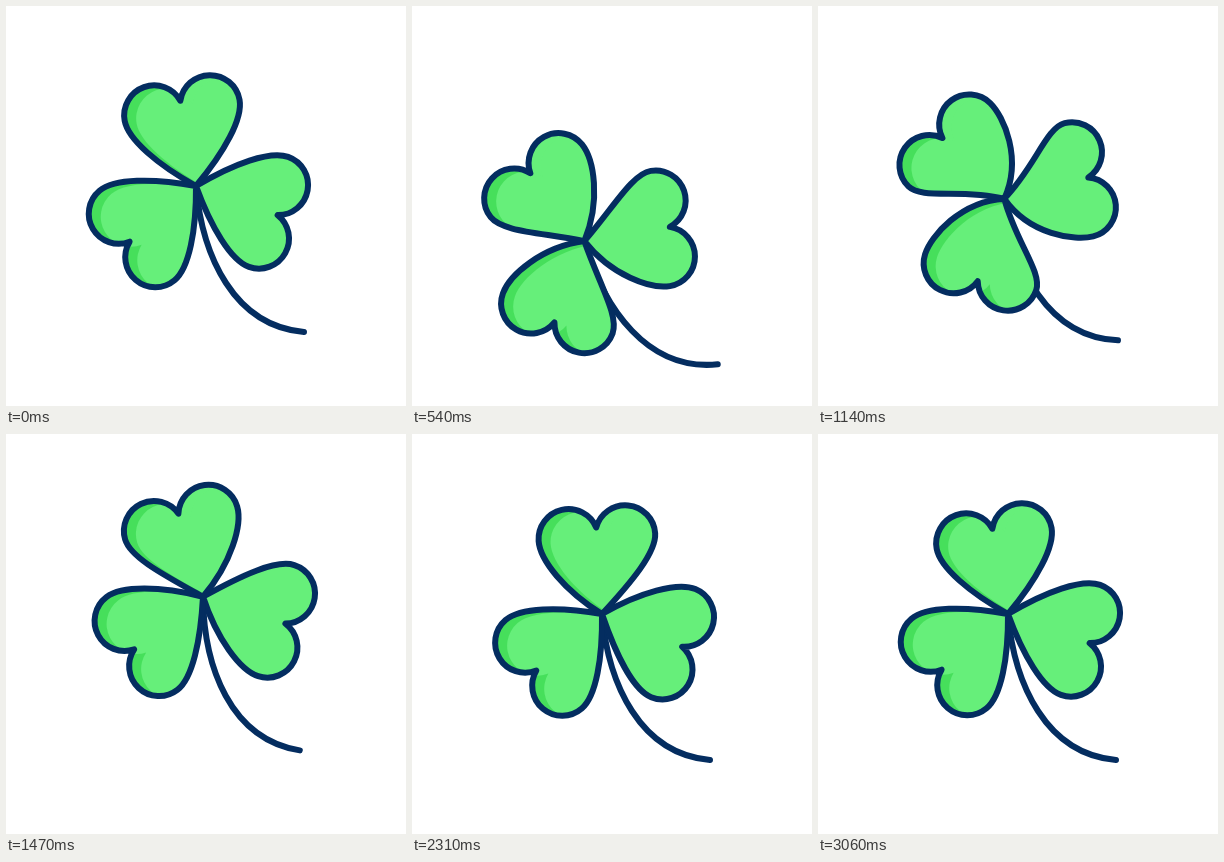
Recreate the animation shown at these times as an HTML page with a canvas. Size 400x400 px, loop 5090 ms.

```html
<!DOCTYPE html>
<html lang="en">
<head>
<meta charset="utf-8">
<title>Swaying clover</title>
<style>
  html, body { margin: 0; height: 100%; overflow: hidden; background: #fff; }
  canvas { display: block; width: 100vw; height: 100vh; }
</style>
</head>
<body>
<canvas id="stage" width="400" height="400"></canvas>
<script>
const LOOP = 5090, STEP = 30, END = 3060;
const NAVY = "#042d60", LIGHT = "#66ef7a", SHADE = "#46df5b";
const LOBE = { x: 28.4, y: -77, r: 30 };
const ctx = document.getElementById("stage").getContext("2d");
const stem = new Path2D("M0 0C6 70 38 140 108 146");
const radians = degrees => degrees * Math.PI / 180;

// Ease between a few turning points [time, value, skew]; a skew below 1 starts faster.
function swing(t, turns) {
  let from = 0, value = 0;
  for (const [to, next, skew = 1] of turns) {
    if (t < to) {
      const u = Math.max(0, (t - from) / (to - from)) ** skew;
      return value + (next - value) * u * u * (3 - 2 * u);
    }
    from = to;
    value = next;
  }
  return value;
}

const sway = t => swing(t, [[620, 1], [1440, -0.38, 1.3], [2300, 0]]);
const bob = t => swing(t, [[600, 56, 0.75], [1420, -18, 1.4], [2250, 0, 0.75]]);
const flap = t => swing(t, [[1000, -34], [1820, 19], [2540, -7], [2870, 0]]);

// Heart with its tip at the origin; bending turns only the part near the tip.
function heart(bend) {
  const c = Math.cos(radians(bend)), s = Math.sin(radians(bend));
  const near = x => [x * c + 28 * s, x * s - 28 * c];
  const { x, y, r } = LOBE, side = x + r;
  const notch = y - Math.sqrt(r * r - x * x);
  return new Path2D(`M0 0C${near(34)} ${side} -58 ${side} ${y}
    A${r} ${r} 0 0 0 0 ${notch}A${r} ${r} 0 0 0 ${-side} ${y}
    C${-side} -58 ${near(-34)} 0 0Z`);
}

// Slower leaves trail behind the quick one.
const leaves = [
  { angle: 109.6, slow: 1.03, shaded: false },
  { angle: -130, slow: 1, shaded: true },
  { angle: -10.4, slow: 1.065, shaded: true, plainRight: true }
];

function drawLeaf({ angle, slow, shaded, plainRight }, t, tilt) {
  const turn = flap(t / slow);
  const rotation = radians(angle + tilt + turn);
  const shape = heart(-0.6 * turn);
  ctx.save();
  ctx.rotate(rotation);
  ctx.fillStyle = shaded ? SHADE : LIGHT;
  ctx.fill(shape);
  if (shaded) {
    // The light always falls from the right of the stage.
    ctx.save();
    ctx.clip(shape);
    ctx.fillStyle = LIGHT;
    if (plainRight) {
      ctx.beginPath();
      ctx.arc(LOBE.x, LOBE.y, LOBE.r, 0, 2 * Math.PI);
      ctx.fill();
    }
    ctx.rotate(-rotation);
    ctx.translate(12, 3);
    ctx.rotate(rotation);
    ctx.fill(shape);
    ctx.restore();
  }
  ctx.stroke(shape);
  ctx.restore();
}

const start = performance.now();

function draw() {
  const elapsed = (performance.now() - start) % LOOP;
  const t = Math.min(END, Math.floor(elapsed / STEP) * STEP);
  const lean = sway(t), tilt = -11.3 * lean;
  ctx.clearRect(0, 0, 400, 400);
  ctx.strokeStyle = NAVY;
  ctx.lineWidth = 6;
  ctx.lineCap = ctx.lineJoin = "round";
  ctx.save();
  ctx.translate(190 - 18.5 * lean, 180 + bob(t));
  ctx.save();
  ctx.rotate(radians(tilt));
  ctx.stroke(stem);
  ctx.restore();
  for (const leaf of leaves) drawLeaf(leaf, t, tilt);
  ctx.restore();
  requestAnimationFrame(draw);
}
draw();
</script>
</body>
</html>
```
